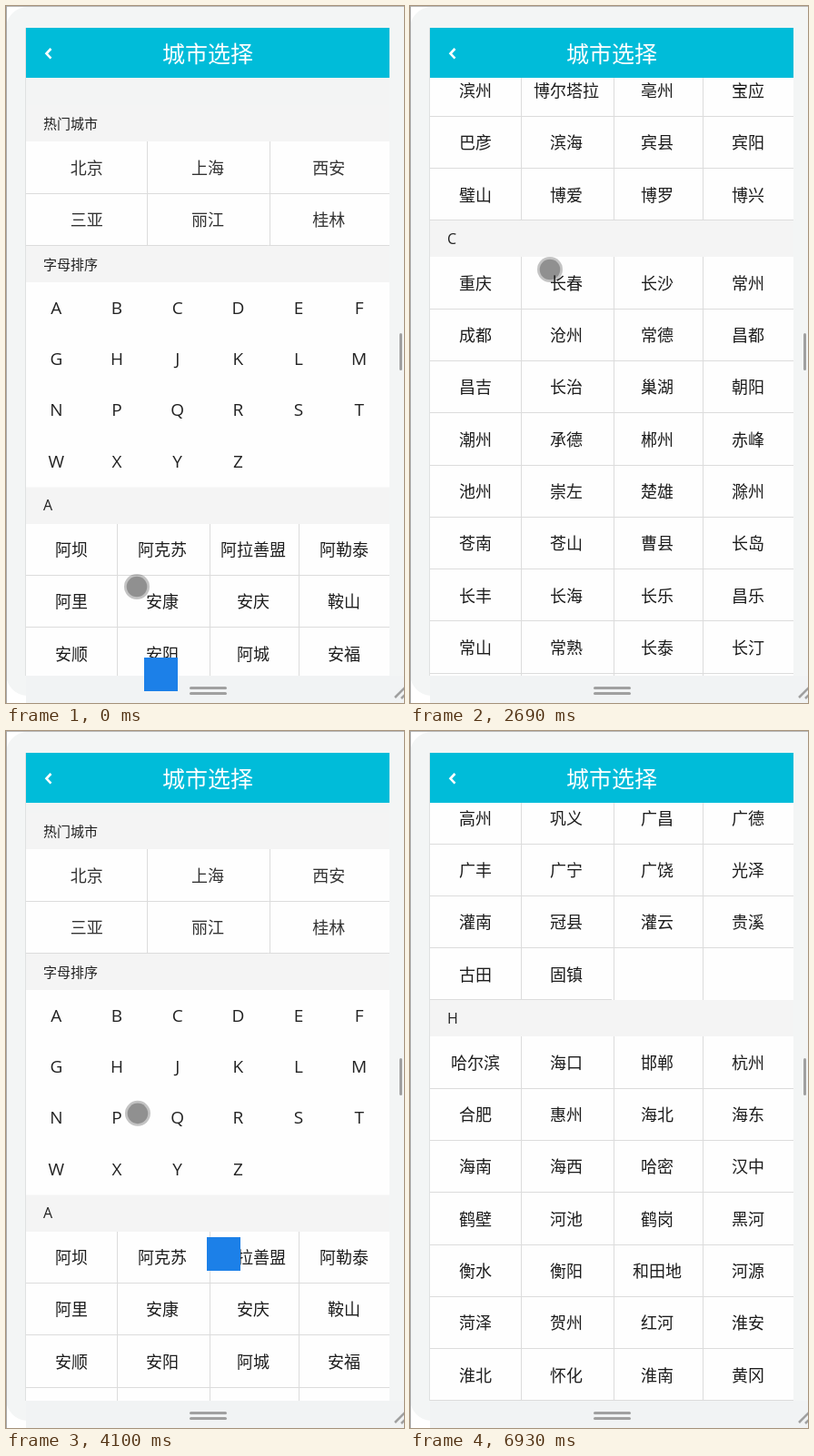
Animation, 438 px wide and 767 px high, one loop 7.03 s. Source, as an HTML page with a canvas:

```html
<!DOCTYPE html>
<html lang="zh">
<head>
<meta charset="utf-8">
<style>
html, body { margin: 0; width: 100%; height: 100%; overflow: hidden; background: #fff; }
canvas { display: block; }
</style>
</head>
<body>
<canvas id="stage" width="438" height="767"></canvas>
<script>
const ctx = document.getElementById('stage').getContext('2d');
const LOOP = 7030;
const LEFT = 22, RIGHT = 422, TOP = 79, BOTTOM = 737, WIDTH = RIGHT - LEFT;
const HEAD = 40, ROW = 57.3, LETTER_ROW = 56.4;
const CJK = '"Noto Sans CJK SC", "Noto Sans CJK", sans-serif';
const LATIN = '"Open Sans", "Noto Sans", sans-serif';
const LINE = '#dcdcdc', PAPER = '#fefefe';

const hot = '北京 上海 西安 三亚 丽江 桂林'.split(' ');
const letters = 'ABCDEFGHJKLMNPQRSTWXYZ';
const cities = {
  A: '阿坝 阿克苏 阿拉善盟 阿勒泰 阿里 安康 安庆 鞍山 安顺 安阳 阿城 安福 安吉 安平 安丘 安溪 安义 安远 安岳 安泽',
  B: '北京 白城 白山 白银 百色 保定 宝鸡 保山 包头 巴中 北海 蚌埠 本溪 毕节 巴彦淖尔 巴音郭楞 ' +
     '滨州 博尔塔拉 亳州 宝应 巴彦 滨海 宾县 宾阳 璧山 博爱 博罗 博兴',
  C: '重庆 长春 长沙 常州 成都 沧州 常德 昌都 昌吉 长治 巢湖 朝阳 潮州 承德 郴州 赤峰 ' +
     '池州 崇左 楚雄 滁州 苍南 苍山 曹县 长岛 长丰 长海 长乐 昌乐 常山 常熟 长泰 长汀 ' +
     '长兴 昌邑 潮安 呈贡 城口 成武 茌平 崇仁 崇义 崇州 淳安 慈溪 从化 枞阳 茶陵 长葛',
  D: '大连 东莞 大理 德阳 大庆 大同 丹东 达州 德州 德宏 迪庆 定西 东营 大丰 大足 当涂',
  G: '广州 贵阳 桂林 赣州 甘南 甘孜 广安 广元 贵港 果洛 固原 高安 高州 巩义 广昌 广德 广丰 广宁 广饶 光泽 ' +
     '灌南 冠县 灌云 贵溪 古田 固镇',
  H: '哈尔滨 海口 邯郸 杭州 合肥 惠州 海北 海东 海南 海西 哈密 汉中 鹤壁 河池 鹤岗 黑河 ' +
     '衡水 衡阳 和田地 河源 菏泽 贺州 红河 淮安 淮北 怀化 淮南 黄冈 黄南 黄山 黄石 呼和浩特 ' +
     '葫芦岛 呼伦贝尔 湖州 海安 海宁 海盐 海阳 含山 汉寿 和县 衡东 衡山'
};

// Sections stand one under another
const lettersY = HEAD + 2 * ROW;
const tops = {};
let nextY = lettersY + HEAD + 4 * LETTER_ROW;
const sections = Object.entries(cities).map(([name, names]) => {
  const list = names.split(' '), y = tops[name] = nextY;
  nextY += HEAD + Math.ceil(list.length / 4) * ROW;
  return { name, list, y };
});

const linear = p => p;
const smooth = p => p * p * (3 - 2 * p);
const out = p => 1 - (1 - p) ** 2;
const jump = () => 1;

// Each move: start, end, easing, target values
const scrolling = [
  [720, 1120, smooth, 0],
  [1740, 1741, jump, tops.B],
  [2541, 2672, linear, tops.C - 157],
  [2672, 3000, out, tops.C + 150],
  [3064, 3194, linear, tops.C + 11],
  [3194, 3835, linear, -30],
  [3950, 4200, smooth, 0],
  [4470, 4471, jump, tops.H],
  [4730, 5110, out, tops.H + 102],
  [5250, 5610, smooth, tops.H - 217]
];
const pointing = [
  [0, 410, out, 134, 180],
  [545, 1100, smooth, 124, 298],
  [1890, 2272, linear, 111, 596],
  [2405, 2541, linear, 144, 513],
  [2541, 2672, linear, 154, 290],
  [2672, 2800, out, 165, 190],
  [2800, 3194, smooth, 199, 603],
  [3320, 3710, smooth, 210, 527],
  [3840, 4097, linear, 145, 421],
  [4097, 4360, out, 122, 358],
  [4600, 5110, out, 178, 215],
  [5250, 5610, smooth, 200, 534],
  [5620, 5860, linear, 411, 718],
  [5870, 5990, linear, 282, 718]
];
const POINTER_END = 6110;

// from, to, x, y
const badges = [[0, 1610, 152, 717], [3830, 4860, 221, 557], [5740, 6930, 211, 564]];

function play(moves, initial, t) {
  return moves.reduce((value, [from, to, ease, ...target]) => {
    if (t < from) return value;
    const p = ease(Math.min(1, (t - from) / (to - from)));
    return value.map((v, i) => v + (target[i] - v) * p);
  }, initial);
}

// The picture refreshes in steps that get slightly shorter
const tick = k => 136.2 * k - 0.13 * k * k;
function lastTick(t) {
  let k = 0;
  while (tick(k + 1) <= t) k++;
  return tick(k);
}

function rect(x, y, w, h, color) {
  ctx.fillStyle = color;
  ctx.fillRect(x, y, w, h);
}

function text(str, x, y, size, { color = '#222', align = 'center', weight = 300 } = {}) {
  const latin = str.length === 1;
  ctx.font = `${latin ? 400 : weight} ${size}px ${latin ? LATIN : CJK}`;
  ctx.textAlign = align;
  ctx.fillStyle = color;
  ctx.fillText(str, x, Math.round(y + size * (latin ? 0.36 : 0.38)));
}

function stroke(points, color, width) {
  ctx.beginPath();
  points.forEach(p => ctx.lineTo(...p));
  ctx.strokeStyle = color;
  ctx.lineWidth = width;
  ctx.stroke();
}

function disc(x, y, r, color) {
  ctx.beginPath();
  ctx.arc(x, y, r, 0, 7);
  ctx.fillStyle = color;
  ctx.fill();
}

function round(x, y, w, h, r, color) {
  ctx.beginPath();
  ctx.roundRect(x, y, w, h, r);
  ctx.fillStyle = color;
  ctx.fill();
}

const snap = y => Math.ceil(y - 0.1);

function heading(str, y) {
  rect(LEFT, snap(y), WIDTH, HEAD, '#f4f4f4');
  text(str, 41, y + 20.5, str.length === 1 ? 16 : 15, { align: 'left' });
}

function grid(list, y, lines, color) {
  const cols = lines.length + 1, w = WIDTH / cols;
  const top = snap(y), height = snap(y + Math.ceil(list.length / cols) * ROW) - top;
  rect(LEFT, top, WIDTH, height, PAPER);
  lines.forEach(x => rect(x, top, 1, height, LINE));
  list.forEach((str, i) => {
    const col = i % cols, cy = y + Math.floor(i / cols) * ROW;
    if (cy < TOP - ROW || cy > BOTTOM) return;
    rect(LEFT + col * w, snap(cy + ROW) - 1, w, 1, LINE);
    text(str, LEFT + (col + 0.5) * w, cy + 29, 18, { color });
  });
}

function drawLetters(y) {
  rect(LEFT, snap(y), WIDTH, 4 * LETTER_ROW, PAPER);
  [...letters].forEach((ch, i) =>
    text(ch, LEFT + (i % 6 + 0.5) * WIDTH / 6, y + (Math.floor(i / 6) + 0.5) * LETTER_ROW, 19));
}

function drawList(scroll) {
  const y = TOP - scroll;
  ctx.save();
  ctx.beginPath();
  ctx.rect(LEFT, TOP, WIDTH, BOTTOM - TOP);
  ctx.clip();
  rect(LEFT, TOP, WIDTH, BOTTOM - TOP, '#f3f4f4');
  heading('热门城市', y);
  grid(hot, y + HEAD, [155, 290], '#333');
  heading('字母排序', y + lettersY);
  drawLetters(y + lettersY + HEAD);
  sections.forEach(s => {
    heading(s.name, y + s.y);
    grid(s.list, y + s.y + HEAD, [122, 224, 322], '#1c1c1c');
  });
  ctx.restore();
}

function drawFrame() {
  const grip = '#a0a0a0';
  rect(0, 0, 438, 767, '#fff');
  round(0, 1, 470, 758, 24, '#f3f5f5');
  rect(LEFT, BOTTOM, 416, 30, '#f1f3f4');
  rect(0, 0, 438, 1, '#b8b8b8');
  rect(0, 0, 1, 767, '#a8a8a8');
  rect(21, 24, 1, BOTTOM - 24, '#dfe1e1');
  round(433, 360, 3, 41, 1.5, grip);
  [749, 755].forEach(y => round(202, y, 41, 3, 1.5, grip));
  stroke([[428, 761], [439, 750]], grip, 2.5);
  stroke([[435, 762], [439, 758]], grip, 2.5);
}

function drawTitle() {
  rect(LEFT, 24, WIDTH, TOP - 24, '#00bcd9');
  stroke([[49.5, 47], [44.5, 52.3], [49.5, 57.6]], '#fff', 2.6);
  text('城市选择', 222, 52, 25, { color: '#fff', weight: 500 });
}

function draw(t) {
  drawFrame();
  drawList(play(scrolling, [-30], t)[0]);
  drawTitle();
  if (t < POINTER_END) {
    const [x, y] = play(pointing, [144, 639], t);
    disc(x, y, 14, 'rgba(0,0,0,.23)');
    disc(x, y, 11.3, 'rgba(0,0,0,.26)');
  }
}

function drawBadges(t) {
  badges.forEach(([from, to, x, y]) => {
    if (t >= from && t < to) rect(x, y, 37, 37, '#1c80e8');
  });
}

const start = performance.now();
function loop() {
  const t = (performance.now() - start) % LOOP;
  draw(lastTick(t));
  drawBadges(t);
  requestAnimationFrame(loop);
}
loop();
</script>
</body>
</html>
```
